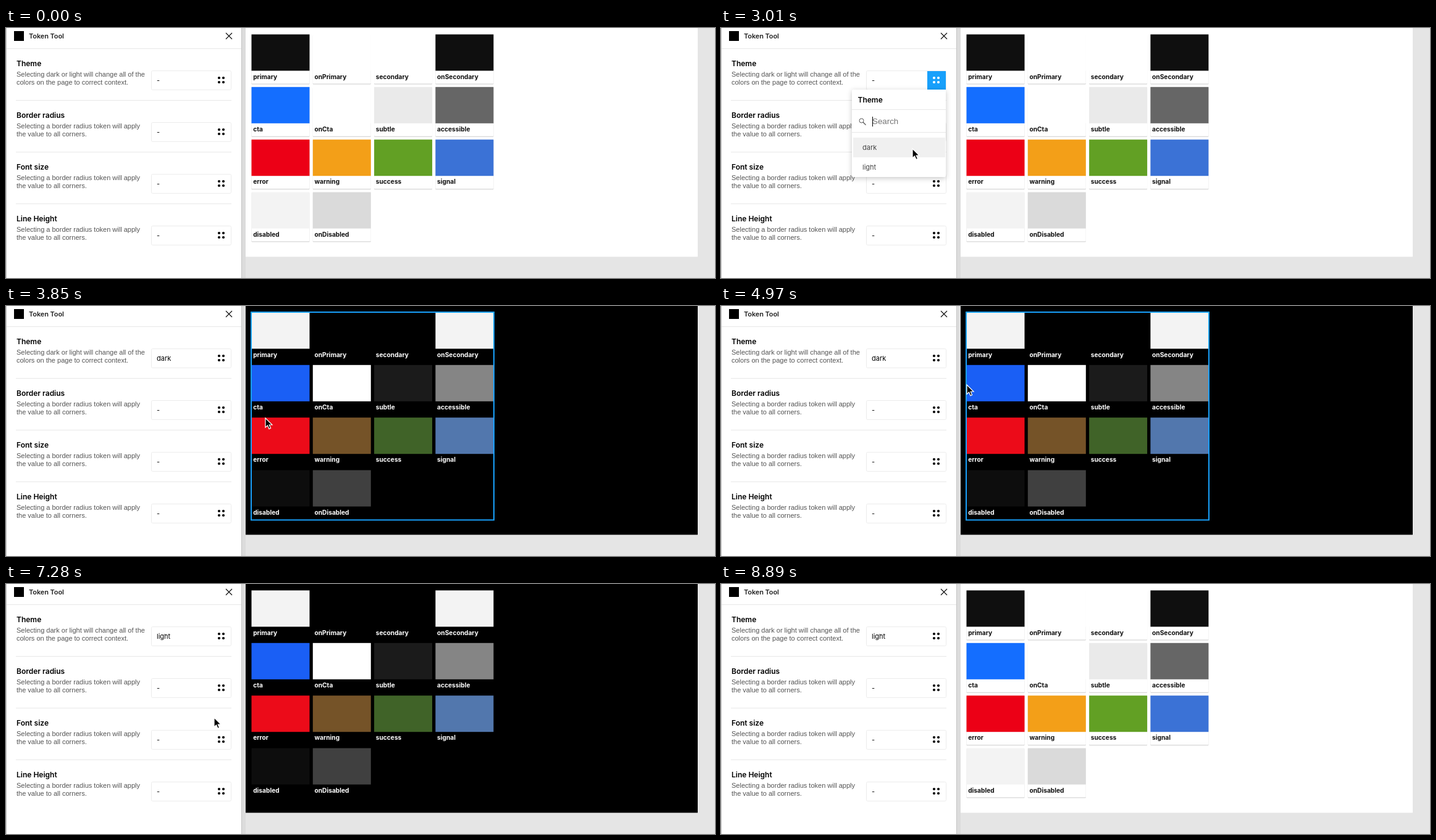
Animation of 1148x406 px, one loop 8.96 s. Source, as an HTML page:

```html
<!DOCTYPE html>
<html lang="en">
<head>
<meta charset="utf-8">
<title>Token Tool</title>
<style>
html, body { margin: 0; width: 100%; height: 100%; overflow: hidden; background: #e5e5e5; }
svg { display: block; }
text { font: 11px Inter, sans-serif; white-space: pre; }
.title { font-weight: 600; letter-spacing: -.1px; fill: #222; }
.head { font-size: 12px; font-weight: 600; }
.desc { font: 11px "Liberation Sans", Arial, sans-serif; fill: #555; }
.search { font: 13.33px "Liberation Sans", Arial, sans-serif; fill: #757575; }
.item { fill: #444; }
.label { font-size: 10.2px; font-weight: 700; }
.rule { fill: #e8e8e8; }
#menu { filter: drop-shadow(0 2px 4px rgba(0, 0, 0, .22)); }
.card { filter: drop-shadow(0 1px .7px rgba(0, 0, 0, .2)); }
</style>
</head>
<body>
<svg id="stage" width="1148" height="406" viewBox="0 0 1148 406">
  <rect id="page" x="388" width="732" height="371.5"/>
  <g id="cards"></g>
  <rect id="outline" x="397" y="10" width="393" height="337.5" fill="none" stroke="#18a0fb" stroke-width="2"/>
  <rect x="381" width="7" height="406" fill="#dcdcdc"/>
  <rect width="382" height="406" fill="#c4c4c4"/>
  <rect x="1" width="380" height="406" fill="#fff"/>
  <rect x="1" y="33" width="380" height="1" class="rule"/>
  <rect x="13" y="5" width="16" height="16"/>
  <text x="37" y="17" class="title">Token Tool</text>
  <path d="M356 8l10 10m0-10l-10 10" stroke="#111" stroke-width="1.2"/>
  <g id="sections"></g>
  <g id="menu">
    <rect x="212" y="100" width="152" height="142" rx="2" fill="#fff"/>
    <rect id="row" x="214" width="149" height="32" fill="#f0f0f0"/>
    <text x="221.5" y="121" class="head">Theme</text>
    <rect x="212" y="132" width="152" height="1" class="rule"/>
    <circle cx="227.5" cy="150.5" r="3.5" fill="none" stroke="#555"/>
    <path d="M230 153l4.5 4.5" stroke="#555" stroke-width="1.3"/>
    <text x="245" y="156" class="search">Search</text>
    <rect x="245" y="144" width="1" height="16"/>
    <rect x="212" y="169" width="152" height="1" class="rule"/>
    <text x="229" y="198" class="item">dark</text>
    <text x="229" y="230" class="item">light</text>
  </g>
  <g id="pointer">
    <circle id="ring" r="21" fill="none" stroke="#000" stroke-opacity=".45" stroke-width="2"/>
    <path d="M0 0V15.2L3.5 12L6 17.6L8.6 16.4L6.2 11H11Z" stroke="#fff" stroke-width="1.2"/>
  </g>
</svg>
<script>
const $ = id => document.getElementById(id);
const LOOP = 8960, STEP = 70;

// name, light colour, dark colour
const swatches = [
  ["primary", "#0f0f0f", "#f3f3f3"], ["onPrimary", "#fff", "#000"],
  ["secondary", "#fff", "#000"], ["onSecondary", "#0f0f0f", "#f3f3f3"],
  ["cta", "#146eff", "#1a5ff5"], ["onCta", "#fff", "#fff"],
  ["subtle", "#eaeaea", "#1b1b1b"], ["accessible", "#666", "#858585"],
  ["error", "#ec0016", "#ec0b19"], ["warning", "#f39f18", "#755328"],
  ["success", "#62a024", "#406328"], ["signal", "#3b72d6", "#5277ad"],
  ["disabled", "#f3f3f3", "#0d0d0d"], ["onDisabled", "#dadada", "#404040"]
];

const radiusText = ["Selecting a border radius token will apply", "the value to all corners."];
const sections = [
  ["Theme", "Selecting dark or light will change all of the", "colors on the page to correct context."],
  ["Border radius", ...radiusText],
  ["Font size", ...radiusText],
  ["Line Height", ...radiusText]
];

$("cards").innerHTML = swatches.map(([name], i) => {
  const x = 397.5 + i % 4 * 99.3, y = 10.4 + (i >> 2) * 85.4;
  return `<g transform="translate(${x} ${y})">
    <rect class="card" width="94" height="80" rx="1"/>
    <rect class="fill" width="94" height="59"/>
    <text class="label" x="2.7" y="72.2">${name}</text></g>`;
}).join("");

$("sections").innerHTML = sections.map(([head, a, b], i) => `
  <g transform="translate(0 ${i * 84})">
    <text x="17" y="62" class="head">${head}</text>
    <text x="17" y="79" class="desc">${a}</text>
    <text x="17" y="92" class="desc">${b}</text>
    <rect x="235.5" y="69.5" width="129" height="31" rx="2" fill="#fff" stroke="#ececec"/>
    <text x="244" y="89" class="value">-</text>
    <rect class="button" x="334" y="70" width="30" height="30" fill="none"/>
    <g class="dots">${[81, 88].map(y => [345, 352].map(x =>
      `<circle cx="${x}" cy="${y}" r="2.1"/>`).join("")).join("")}</g>
    ${i < 3 ? '<rect x="16" y="117" width="349" height="1" class="rule"/>' : ""}
  </g>`).join("");

const all = sel => [...document.querySelectorAll(sel)];
const fills = all(".fill"), cards = all(".card"), labels = all(".label");
const value = all(".value")[0], button = all(".button")[0], dots = all(".dots")[0];

// pointer path: time, x, y
const path = [
  [70, 427, 374], [210, 423, 358], [350, 423, 358], [560, 293, 110], [700, 298, 106],
  [1120, 346, 83], [1680, 346, 83], [2310, 310, 196], [3570, 310, 196], [3990, 475, 175],
  [4480, 475, 175], [4970, 398, 128], [5390, 349, 93], [5740, 349, 93], [6300, 337, 217],
  [7420, 337, 217], [7910, 375, 190], [8050, 384, 215], [8330, 412, 318], [8400, 412, 318],
  [8540, 421, 384]
];
const clicks = [1470, 2660, 5600, 6650];
const within = (t, a, b) => t >= a && t < b;
const show = (el, on) => el.setAttribute("visibility", on ? "visible" : "hidden");

function pointerAt(t) {
  const i = path.findIndex(p => p[0] > t);
  if (i < 0) return path.at(-1).slice(1);
  const [t1, x1, y1] = path[i], [t0, x0, y0] = path[Math.max(0, i - 1)];
  const k = t1 === t0 ? 0 : (t - t0) / (t1 - t0);
  return [x0 + (x1 - x0) * k, y0 + (y1 - y0) * k];
}

function setTheme(dark) {
  const bg = dark ? "#000" : "#fff";
  $("page").setAttribute("fill", bg);
  swatches.forEach((s, i) => {
    fills[i].setAttribute("fill", s[dark ? 2 : 1]);
    cards[i].setAttribute("fill", bg);
    labels[i].setAttribute("fill", dark ? "#fff" : "#111");
  });
}

let isDark;
function draw(now) {
  const t = Math.floor(now % LOOP / STEP) * STEP;
  const [x, y] = pointerAt(t);
  const visible = within(t, 70, 8610);
  const open = within(t, 1540, 3290) || within(t, 5670, 6860);
  const dark = within(t, 3290, 7350);
  if (dark !== isDark) setTheme(isDark = dark);

  value.textContent = t < 3290 ? "-" : t < 6860 ? "dark" : "light";
  const active = open || within(x, 334, 365) && within(y, 69, 101);
  button.setAttribute("fill", active ? "#18a0fb" : "none");
  dots.setAttribute("fill", active ? "#fff" : "#000");

  show($("menu"), open);
  show($("row"), open && within(y, 178, 242));
  $("row").setAttribute("y", y < 210 ? 178 : 210);
  show($("outline"), visible && within(x, 397, 791) && within(y, 9, 348));
  show($("pointer"), visible);
  $("pointer").setAttribute("transform", `translate(${x} ${y})`);
  show($("ring"), clicks.includes(t));
  requestAnimationFrame(draw);
}
draw(0);
</script>
</body>
</html>
```
